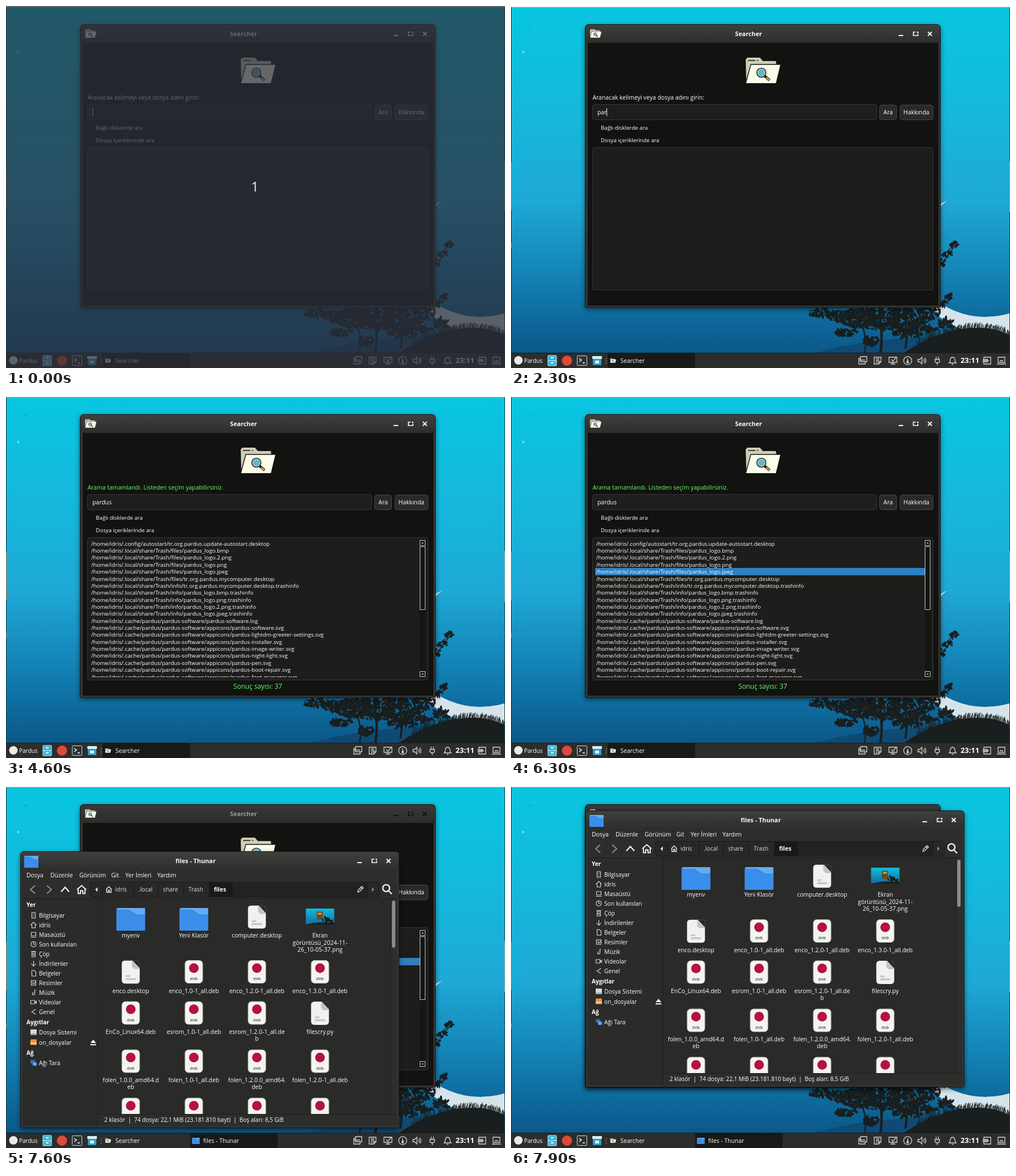
Animation, 878 px wide and 638 px high, one loop 8 s. Source, as an HTML page with a canvas:

```html
<!DOCTYPE html>
<html lang="tr">
<head>
<meta charset="utf-8">
<title>Searcher</title>
<style>
html, body { margin: 0; width: 100%; height: 100%; overflow: hidden; background: #0b4a78; }
canvas { display: block; width: 878px; height: 638px; }
</style>
</head>
<body>
<canvas id="stage" width="878" height="638"></canvas>
<script>
const W = 878, H = 638, LOOP = 8000;
const stage = document.getElementById('stage').getContext('2d');
let c = stage;

// ---- drawing helpers ----
function box(x, y, w, h, fill, r = 0, line) {
  c.beginPath();
  c.roundRect(x, y, w, h, r);
  if (fill) { c.fillStyle = fill; c.fill(); }
  if (line) { c.strokeStyle = line; c.lineWidth = 1; c.stroke(); }
}
function dot(x, y, r, fill) {
  c.beginPath();
  c.arc(x, y, r, 0, 7);
  c.fillStyle = fill;
  c.fill();
}
function poly(points, fill) {
  c.beginPath();
  points.forEach(p => c.lineTo(...p));
  c.closePath();
  c.fillStyle = fill;
  c.fill();
}
function icon(d, x, y, color = '#dededc', width = 1.2, filled = false) {
  c.save();
  c.translate(x, y);
  c.lineWidth = width;
  c.strokeStyle = c.fillStyle = color;
  const p = new Path2D(d);
  filled ? c.fill(p) : c.stroke(p);
  c.restore();
}
function text(s, x, y, size = 10.4, color = '#fff', align = 'left', weight = 400) {
  c.font = `${weight} ${size}px "Open Sans", "Noto Sans", sans-serif`;
  c.textAlign = align;
  c.fillStyle = color;
  c.fillText(s, x, y + size * 0.35);
}
function seeded(n) {
  return () => (n = (n * 16807) % 2147483647) / 2147483647;
}
function layer(paint) {
  const cv = document.createElement('canvas');
  cv.width = W; cv.height = H;
  c = cv.getContext('2d');
  paint();
  c = stage;
  return cv;
}

// ---- wallpaper ----
const DARK = '#191e1e', MOON = '#d5e4eb';
function foliage(rnd, x, y, rx, ry, n) {
  c.fillStyle = DARK;
  for (let i = 0; i < n; i++) {
    const a = rnd() * 6.283, d = Math.sqrt(rnd());
    c.beginPath();
    c.ellipse(x + Math.cos(a) * d * rx, y + Math.sin(a) * d * ry,
      1.5 + rnd() * 3, 0.8 + rnd() * 1.5, rnd() * 3, 0, 7);
    c.fill();
  }
}
const ridge = x => 567 + 0.0042 * (x - 822) ** 2 * (x < 822 ? 0.62 : 1);

// the lower limb: below the inner circle, inside the outer one
function moon() {
  c.save();
  c.beginPath();
  c.rect(700, 510, W, H);
  c.clip();
  c.beginPath();
  c.rect(0, 0, W * 2, H);
  c.moveTo(979, 404);
  c.arc(835, 404, 144, 0, 2 * Math.PI);
  c.clip('evenodd');
  dot(835, 450, 127, MOON);
  box(835, 500, 43, 80, MOON);
  c.restore();
  poly([[750, 356], [757, 348], [767, 343], [757, 352]], MOON);
}
const wallpaper = layer(() => {
  const rnd = seeded(77);
  const sky = c.createLinearGradient(0, 0, 0, 612);
  [[0, '#08c6e1'], [0.3, '#15b8dc'], [0.56, '#1ea9d6'], [0.75, '#1587ba'], [0.9, '#0e6a9c'], [1, '#0b5888']]
    .forEach(s => sky.addColorStop(...s));
  box(0, 0, W, H, sky);
  dot(21.5, 81, 2.3, '#6cdcec');
  dot(34, 35, 0.8, '#0a4a58');
  moon();
  // far hill
  c.beginPath();
  c.moveTo(530, 612);
  c.quadraticCurveTo(640, 582, 760, 584);
  c.lineTo(760, 612);
  c.fillStyle = '#0e4a74';
  c.fill();
  // ground and grass
  c.beginPath();
  c.moveTo(640, 612);
  for (let x = 640; x <= W; x += 2) c.lineTo(x, Math.min(612, ridge(x)));
  c.lineTo(W, 612);
  c.fillStyle = DARK;
  c.fill();
  c.strokeStyle = DARK;
  c.lineWidth = 0.8;
  for (let i = 0; i < 190; i++) {
    const x = 715 + rnd() * 163, h = 4 + rnd() * (x < 760 ? 11 : 6);
    c.beginPath();
    c.moveTo(x, ridge(x) + 2);
    c.lineTo(x + rnd() * 8 - 2, ridge(x) - h);
    c.stroke();
  }
  // trees
  [['M622 612Q627 590 619 566M626 598L636 582', 2.5], ['M650 612Q655 580 648 540M652 575L668 548M652 570L632 548', 4.5],
   ['M694 604Q698 580 694 550M696 580L712 562M696 582L684 566', 3.5], ['M528 536L610 552L650 566', 2],
   ['M755 458L786 416M757 440L778 424M754 526L776 506', 1.5]]
    .forEach(([d, w]) => icon(d, 0, 0, DARK, w));
  [[548, 541, 24, 8, 70], [580, 546, 26, 11, 85], [612, 550, 34, 17, 190], [655, 538, 46, 16, 220],
   [700, 552, 36, 20, 240], [735, 537, 20, 16, 100], [590, 576, 22, 6, 60], [634, 590, 13, 9, 55],
   [698, 577, 26, 9, 90], [650, 562, 36, 9, 95], [735, 569, 15, 6, 30], [768, 438, 10, 5, 17],
   [780, 421, 7, 6, 16], [759, 452, 6, 7, 14], [770, 512, 8, 6, 20], [760, 526, 10, 6, 20]]
    .forEach(f => foliage(rnd, ...f));
  // leafy plant
  c.fillStyle = DARK;
  for (let i = 0; i < 11; i++) {
    const a = -2.9 + i * 0.27, r = 8 + (i % 3) * 3;
    c.beginPath();
    c.ellipse(765 + Math.cos(a) * r, 568 + Math.sin(a) * r * 1.2, 6, 2.2, a, 0, 7);
    c.fill();
  }
  // edges
  box(0, 0, W, 2, '#f2f4f4');
  box(0, 2, 1, 610, '#123640');
  box(0, 275, 1, 85, '#b0702c');
  box(0, 418, 1, 8, '#b0702c');
  box(877, 2, 1, 610, '#174452');
  box(877, 273, 1, 90, '#a7a493');
});

// ---- shared pieces ----
function searchFolder(x, y, k) {
  c.save();
  c.translate(x, y);
  c.scale(k, k);
  poly([[0, 3], [3, 0], [25, 0], [30, 6], [53, 6], [54, 14], [9, 14], [1, 42]], '#cfcdb6');
  poly([[9, 12], [61, 12], [53, 45], [0, 45]], '#fdfdeb');
  icon('M0 45L9 12H61M4 5H17M20 5H22', 0, 0, '#171715', 1.4);
  icon('M33 32L42 40', 0, 0, '#222', 4.6);
  icon('M36 35L41.5 39.6', 0, 0, '#e39a4c', 2.8);
  dot(27.5, 26.5, 8.8, '#20282c');
  dot(27.5, 26.5, 7.2, '#c4dcd9');
  dot(27.5, 26.5, 6, '#62b7c4');
  c.restore();
}
function blueFolder(x, y, w, h) {
  box(x, y, w, h, '#6fb4f2', w * 0.06);
  c.beginPath();
  c.moveTo(x, y + h * 0.06);
  c.lineTo(x + w * 0.45, y + h * 0.06);
  c.lineTo(x + w * 0.7, y + h * 0.27);
  c.lineTo(x + w, y + h * 0.27);
  c.lineTo(x + w, y + h);
  c.lineTo(x, y + h);
  c.fillStyle = '#3a8eea';
  c.fill();
  poly([[x + w * 0.45, y], [x + w, y], [x + w, y + h * 0.24], [x + w * 0.7, y + h * 0.24]], '#67aaf0');
}
function frame(x, y, w, h, title, tx, active) {
  c.save();
  c.shadowColor = 'rgba(0,0,0,.5)';
  c.shadowBlur = 9;
  c.shadowOffsetY = 3;
  box(x, y, w, h, '#333331', [7, 7, 3, 3]);
  c.restore();
  const g = c.createLinearGradient(0, y, 0, y + 33);
  g.addColorStop(0, active ? '#40403e' : '#383836');
  g.addColorStop(1, '#2d2d2b');
  box(x + 0.5, y + 0.5, w - 1, h - 1, null, [7, 7, 3, 3], '#181817');
  box(x + 1, y + 1, w - 2, 32, g, [6, 6, 0, 0]);
  const tint = active ? '#f8f8f6' : '#9b9b99', my = y + 17;
  text(title, tx, my, 10.8, tint, 'center', 700);
  const bx = x + w, ink = active ? tint : '#111';
  icon('M-4 3H4', bx - 70, my, ink, 2);
  icon('M0 -3H-4V3H4V0M2 -3H4V-1', bx - 44, my, ink, 1.7);
  icon('M-3.5 -3.5L3.5 3.5M3.5 -3.5L-3.5 3.5', bx - 19, my, ink, 1.8);
}

// ---- search window ----
const HOME = '/home/idris/';
const TRASH = HOME + '.local/share/Trash/';
const APPS = HOME + '.cache/pardus/pardus-software/';
const results = [
  HOME + '.config/autostart/tr.org.pardus.update-autostart.desktop',
  ...['logo.bmp', 'logo.2.png', 'logo.png', 'logo.jpeg'].map(n => TRASH + 'files/pardus_' + n),
  TRASH + 'files/tr.org.pardus.mycomputer.desktop',
  TRASH + 'info/tr.org.pardus.mycomputer.desktop.trashinfo',
  ...['bmp', 'png', '2.png', 'jpeg'].map(n => TRASH + 'info/pardus_logo.' + n + '.trashinfo'),
  APPS + 'pardus-software.log',
  ...['software', 'lightdm-greeter-settings', 'installer', 'image-writer', 'night-light', 'pen', 'boot-repair', 'font-manager']
    .map(n => APPS + 'appicons/pardus-' + n + '.svg')
];
const keys = [[1900, 'p'], [2000, 'pa'], [2300, 'par'], [2500, 'pard'], [2600, 'pardu'], [2700, 'pardus']];

function resultList(t) {
  c.save();
  c.beginPath();
  c.rect(145, 251, 583, 245);
  c.clip();
  if (t >= 6300) box(148, 303, 580, 13, '#2f7fc1');
  results.forEach((s, i) => text(s, 150, 260.3 + i * 12.36, 9.75));
  c.restore();
  box(728, 254, 11, 242, '#151513');
  const line = '#c9c9c7';
  box(728.5, 254.5, 9, 9, null, 0, line);
  box(728.5, 265.5, 9, 111, null, 0, line);
  box(728.5, 485.5, 9, 9, null, 0, line);
  icon('M-2 1L0 -1.5L2 1Z', 733, 259, line, 1, true);
  icon('M-2 -1L0 1.5L2 -1Z', 733, 490, line, 1, true);
  text('Sonuç sayısı: 37', 443, 511.5, 11.8, '#66ff66', 'center');
}
function searchWindow(t) {
  frame(130, 32, 626, 500, 'Searcher', 418, t < 6600);
  searchFolder(139, 41, 0.33);
  box(135, 65, 617, 463, '#121210');
  searchFolder(413, 91, 1);
  const done = t >= 4100;
  text(done ? 'Arama tamamlandı. Listeden seçim yapabilirsiniz.' : 'Aranacak kelimeyi veya dosya adını girin:',
    143.5, 161.5, 10.4, done ? '#66ff66' : '#fff');
  box(143.5, 173.5, 500, 27, '#1e1e1c', 4, '#363634');
  const typed = keys.reduce((s, k) => t >= k[0] ? k[1] : s, '');
  text(typed, 152, 187.3);
  const caret = t < 500 || (t >= 1100 && t < 1700) || (t >= 1900 && t < 3300);
  if (caret) box(152 + Math.round(c.measureText(typed).width), 180, 1, 14, '#f4f4f2');
  const fill = t >= 3800 && t < 4600 ? (t >= 4000 && t < 4100 ? '#191917' : '#393937') : '#2a2a28';
  box(648.5, 174.5, 30, 26, fill, 4, '#474745');
  text('Ara', 663.5, 187.3, 10.4, '#fff', 'center');
  box(684.5, 174.5, 58, 26, '#2a2a28', 4, '#474745');
  text('Hakkında', 713.3, 187.3, 10.4, '#fff', 'center');
  text('Bağlı disklerde ara', 158, 214.5, 9.7);
  text('Dosya içeriklerinde ara', 158, 236.5, 9.7);
  box(143.5, 249.5, 599, 251, '#1d1d1b', 4, '#363634');
  if (done) resultList(t);
}

// ---- file manager ----
const places = [
  ['Bilgisayar', 'M-3 -5H3V5H-3ZM-1 -2H1M-1 2H1'], ['idris', 'M-5 0L0 -5L5 0M-3 -1V5H3V-1'],
  ['Masaüstü', 'M-4 -4H4V2H-4ZM-5 4.5H5'], ['Son kullanılan', 'M4.5 0A4.5 4.5 0 1 1 4.5 -.1M0 -3V0H2.5'],
  ['Çöp', 'M-3 -3H3V5H-3ZM-4 -4.5H4M-1 -1V3M1 -1V3'], ['İndirilenler', 'M0 -5V4M-4 0L0 4.5L4 0'],
  ['Belgeler', 'M-3 -5H1L4 -2V5H-3Z'], ['Resimler', 'M-4 -4H4V4H-4ZM-2 0L0 2L4 -2M-2 -2H0'],
  ['Müzik', 'M2 -5V2M2 -4H4M2 2A2 2 0 1 1 0 0'], ['Videolar', 'M-5 -3H2V3H-5ZM2 0L5 -2V2Z'],
  ['Genel', 'M3 -4L-3 0L3 4M4 -4H2M4 4H2M-4 0H-2']
];
const files = [
  ['dir', 'myenv'], ['dir', 'Yeni Klasör'], ['doc', 'computer.desktop'], ['shot', 'Ekran|görüntüsü_2024-11-|26_10-05-37.png'],
  ['doc', 'enco.desktop'], ['deb', 'enco_1.0-1_all.deb'], ['deb', 'enco_1.2.0-1_all.deb'], ['deb', 'enco_1.3.0-1_all.deb'],
  ['deb', 'EnCo_Linux64.deb'], ['deb', 'esrom_1.0-1_all.deb'], ['deb', 'esrom_1.2.0-1_all.de|b'], ['doc', 'filescry.py'],
  ['deb', 'folen_1.0.0_amd64.d|eb'], ['deb', 'folen_1.0-1_all.deb'], ['deb', 'folen_1.2.0.0_amd64.|deb'], ['deb', 'folen_1.2.0-1_all.deb'],
  ['deb', ''], ['deb', ''], ['deb', ''], ['deb', '']
];
const rows = [[239.5, 272.5], [336.5, 370], [409, 442], [494, 527], [579, 612]];
const art = {
  dir(x, y) { blueFolder(x - 25, y - 15.5, 50, 40); },
  doc(x, y) {
    c.save();
    c.beginPath();
    c.roundRect(x - 16, y - 20, 32, 41, 6);
    c.clip();
    box(x - 16, y - 20, 32, 41, '#f1f1f0');
    poly([[x + 2, y - 21], [x + 17, y - 21], [x + 17, y - 5]], '#2a2a28');
    c.restore();
    poly([[x + 2, y - 20], [x + 16, y - 5], [x + 6, y - 5], [x + 2, y - 9]], '#bfc4c8');
    box(x - 9, y + 6, 8, 3, '#c4c8cb', 1);
    box(x - 9, y + 11, 18, 3.5, '#c4c8cb', 1);
  },
  deb(x, y) {
    box(x - 15.5, y - 20, 31, 40, '#f4f4f2', 6, '#bdbdbb');
    dot(x, y - 6.5, 8.5, '#b5123f');
    text('deb', x, y + 12, 7.2, '#6a6a6a', 'center', 700);
  },
  shot(x, y) {
    const g = c.createLinearGradient(0, y - 15, 0, y + 14);
    g.addColorStop(0, '#0fc0de');
    g.addColorStop(1, '#14699e');
    box(x - 25, y - 14.5, 50, 28, g);
    box(x - 6, y - 9, 11, 14, '#6b4a1f', 1);
    box(x - 4, y - 7, 7, 3, '#d3a03c');
    poly([[x - 25, y + 13.5], [x - 5, y + 10], [x + 25, y + 10], [x + 25, y + 13.5]], DARK);
    foliage(seeded(9), x + 10, y + 5, 6, 3, 9);
    foliage(seeded(5), x + 17, y + 8, 5, 3, 7);
  }
};
function fileGrid(t) {
  c.save();
  c.beginPath();
  c.rect(138, 208, 515, 379);
  c.clip();
  files.forEach(([kind, label], i) => {
    const x = 195.5 + (i % 4) * 111, [iy, ly] = rows[i >> 2];
    art[kind](x, iy);
    if (i === 1 && t >= 7000 && t < 7200) box(x - 25, iy - 15.5, 50, 40, 'rgba(255,255,255,.2)', 3);
    label.split('|').forEach((s, k) => text(s, x, ly + k * 12.4, 10.3, '#fff', 'center'));
  });
  c.restore();
  box(655, 211, 6, 83, '#8b8b89', 3);
}
function fileWindow(t) {
  frame(1, 124, 667, 488, 'files - Thunar', 309.5, true);
  box(5, 157, 659, 451, '#2d2d2b');
  blueFolder(8, 132, 25, 21);
  [['Dosya', 12], ['Düzenle', 54], ['Görünüm', 105], ['Git', 161], ['Yer İmleri', 186], ['Yardım', 242]]
    .forEach(([s, x]) => text(s, x, 166.5));

  icon('M4 -7L-4 0L4 7', 23, 191.5, '#8d8d8b', 2);
  icon('M-4 -7L4 0L-4 7', 52, 191.5, '#8d8d8b', 2);
  icon('M-7 4L0 -4L7 4', 80, 191.5, '#f0f0ee', 2.2);
  icon('M-8 0L0 -7L8 0M-6 -1V7H-2V2H2V7H6V-1', 109, 191.5, '#f0f0ee', 1.9);
  icon('M5 -1.5A6 6 0 1 1 5 -1.6M3 3L9 9', 646, 190.5, '#f0f0ee', 2.3);
  box(124.5, 178.5, 508, 26, '#282826', 4, '#1b1b1a');
  box(333, 179, 41, 25, '#191918');
  box(374, 179, 238, 25, '#222220');
  [145, 200, 243, 288, 333, 374, 612].forEach(x => box(x, 179, 1, 25, '#1b1b1a'));
  icon('M2 -4L-2 0L2 4Z', 135, 191.5, '#efefed', 1, true);
  icon('M-2 -4L2 0L-2 4Z', 622, 191.5, '#8d8d8b', 1, true);
  icon('M-5 0L0 -5L5 0M-4 -1V5H-1V1H1V5H4V-1', 157, 191.5, '#efefed', 1.3);
  icon('M-4 5L-3.5 1.5L3 -5L5.5 -2.5L-1 4ZM1 -3L3.5 -.5', 599, 191, '#efefed', 1.3);
  const hover = t >= 7300 && t < 7400;
  [['idris', 178.5], ['.local', 221.5], ['share', 265.5], ['Trash', 310]]
    .forEach(([s, x]) => text(s, x, 191.7, 10.2, s === 'Trash' && hover ? '#fff' : '#dcdcda', 'center'));
  text('files', 352.5, 191.7, 10.4, '#fff', 'center', 700);

  box(5, 207, 659, 1, '#1d1d1c');
  box(5, 208, 132, 400, '#2b2b29');
  box(137, 208, 1, 400, '#1d1d1c');
  box(138, 208, 515, 379, '#2a2a28');
  box(652, 208, 1, 379, '#1d1d1c');
  box(138, 587, 526, 1, '#1d1d1c');
  text('Yer', 12, 218.5, 10.2, '#fff', 'left', 700);
  places.forEach(([s, d], i) => {
    icon(d, 24.5, 237 + i * 17, '#dededc', 1.1);
    text(s, 34, 237.3 + i * 17, 10.2);
  });
  text('Aygıtlar', 12, 425.5, 10.2, '#fff', 'left', 700);
  box(19, 438, 11, 10, '#d9d9d7', 1);
  box(19, 445, 11, 3, '#a8a8a6', 1);
  text('Dosya Sistemi', 34, 443.7, 10.2);
  box(19, 455.5, 11, 10, '#e8963a', 1);
  box(19, 461.5, 11, 2, '#f7dcb4');
  text('on_dosyalar', 34, 461, 10.2);
  icon('M-5 1L0 -5L5 1ZM-5 3H5V5H-5Z', 129.5, 461, '#f4f4f2', 1, true);
  text('Ağ', 12, 479.5, 10.2, '#fff', 'left', 700);
  box(19, 492, 8, 6, '#2f6fb8', 1);
  box(23, 496, 7, 6, '#5aa2ea', 1);
  text('Ağı Tara', 34, 497.7, 10.2);

  if (t < 6700) return;
  fileGrid(t);
  text('2 klasör  |  74 dosya: 22,1 MiB (23.181.810 bayt)  |  Boş alan: 8,5 GiB', 149, 597.5, 10);
}

// ---- panel ----
const tray = [
  [619, 'M-4 -7H7V2H-4ZM-4 -4H-7V6H4V2M-7 -1H4'], [645, 'M-6 -6H6V2L2 6H-6ZM-3 -3H3M-3 0H3M-3 3H0M6 2H2V6'],
  [672, 'M-7 -6H7V3H-7ZM-4 6H4M0 3V6M-3 -2L0 1L6 -6'], [698, 'M7 0A7 7 0 1 1 7 -.1M0 -4V2M-2 4H2M-1 0V3H1V0'],
  [723, 'M-7 -2H-4L0 -6V6L-4 2H-7ZM3 -3Q5 0 3 3M5 -5Q9 0 5 5'], [750, 'M-4 -2H4V2Q0 6 -4 2ZM-2 -7V-2M2 -7V-2M0 4V8'],
  [777, 'M-6 4Q-4 2 -4 -2Q-3 -6 0 -6Q3 -6 4 -2Q4 2 6 4ZM-1.5 6.5H1.5'], [837, 'M-5 -3V-6H7V6H-5V3M-7 0H3M0 -3L3 0L0 3M-7 -2H0M-7 2H0'],
  [863, 'M-6 -6H6V3H-6ZM-8 6H8M-3 0H3']
];
function panel(t) {
  box(0, 611, W, 27, '#2d2d2b');
  box(0, 611, W, 1, '#1a1a19');
  dot(13, 624.5, 7.5, '#eaeae8');
  text('Pardus', 23, 625, 10);
  box(65, 616, 15, 18, '#37b4d8', 1, '#d6f1f8');
  box(65, 624.5, 15, 1, '#e4f6fa');
  box(70, 619, 5, 2, '#fff');
  box(70, 628, 5, 2, '#fff');
  dot(98.5, 625, 9, '#db4a3b');
  box(116.5, 616.5, 17, 17, '#2b3238', 1, '#d4dadd');
  icon('M-5 -4L-1 -1L-5 2M1 4H5', 125, 625, '#fff', 1.4);
  box(143, 617, 17, 5, '#d7eef5', 1);
  box(144, 622, 15, 11, '#2f9fc6', 1);
  box(148, 625, 7, 5, '#e4f4f8');
  [621, 625, 629].forEach(y => box(166, y, 3, 1, '#7d7d7b'));
  const open = t >= 6600;
  box(open ? 324 : 170, 612, 154, 26, '#191918', 3);
  searchFolder(174.5, 621, 0.17);
  text('Searcher', 192.5, 625);
  if (open) {
    blueFolder(327.5, 620, 13, 11);
    text('files - Thunar', 347, 625);
  }
  tray.forEach(([x, d]) => icon(d, x, 625, '#d2d2d0', 1.3));
  text('23:11', 807.5, 624.7, 12.8, '#fff', 'center', 700);
}

// ---- timeline ----
const drag = [[7600, 24, -9], [7700, 71, -34], [7800, 112, -64], [7900, 130, -81]];

function draw(now) {
  const t = now % LOOP;
  c.drawImage(wallpaper, 0, 0);
  searchWindow(t);
  if (t >= 6600) {
    const [, dx, dy] = drag.reduce((p, d) => t >= d[0] ? d : p, [0, 0, 0]);
    c.save();
    c.translate(dx, dy);
    fileWindow(t);
    c.restore();
  }
  panel(t);
  if (t < 100) {
    box(0, 0, W, H, 'rgba(43,47,57,.72)');
    text('1', 438, 319, 23.5, '#f2f2f0', 'center');
  }
  requestAnimationFrame(() => draw(performance.now()));
}
draw(performance.now());
</script>
</body>
</html>
```
